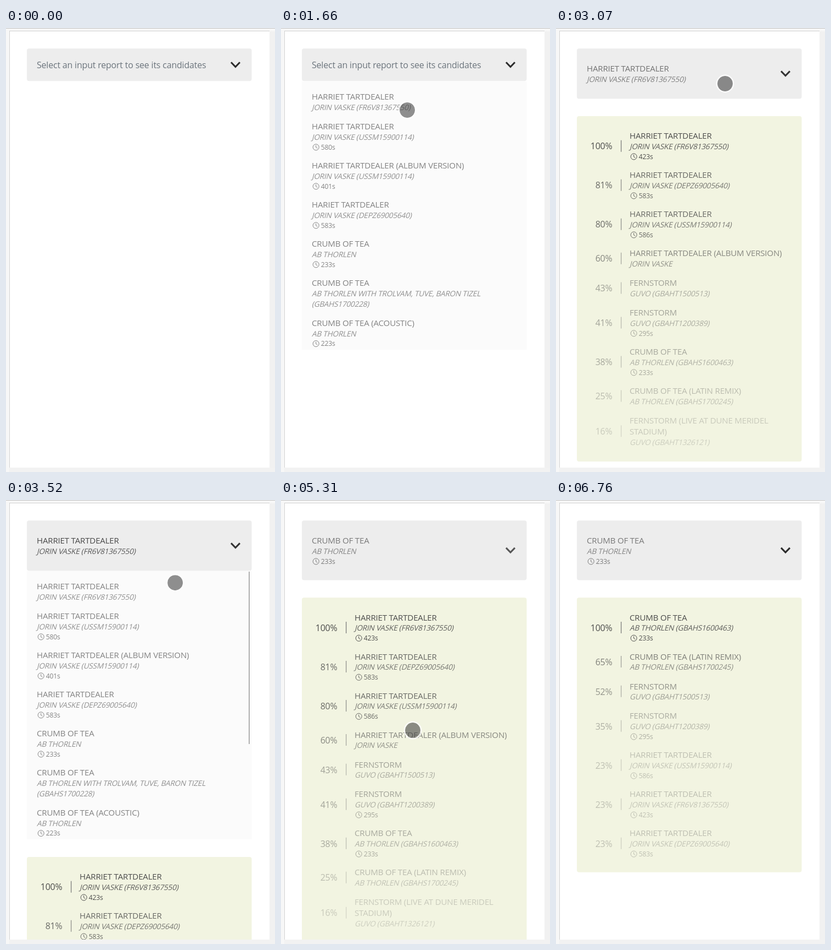
These frames come from a looping animation (490 px wide and 806 px high, 7.21 s). An HTML page with a canvas:

```html
<!DOCTYPE html>
<html lang="en">
<head>
<meta charset="utf-8">
<title>Report candidates</title>
<style>
  html, body { margin: 0; width: 100%; height: 100%; overflow: hidden; background: #f7f7f7; }
  canvas { display: block; width: 490px; height: 806px; }
</style>
</head>
<body>
<canvas id="stage"></canvas>
<script>
const W = 490, H = 806, LOOP = 7210;
const canvas = document.getElementById('stage');
const ctx = canvas.getContext('2d');
const ratio = window.devicePixelRatio || 1;
canvas.width = W * ratio;
canvas.height = H * ratio;

const TUNE = 'HARRIET TARTDEALER', PLAYER = 'JORIN VASKE';
const SONG = 'CRUMB OF TEA', SINGER = 'AB THORLEN';
const ANTHEM = 'FERNSTORM', BAND = 'GUVO';

const item = (title, artist, time) => ({ title: title.split('\n'), artist: artist.split('\n'), time });
const match = (percent, ...rest) => ({ percent, ...item(...rest) });

const reports = [
  item(TUNE, PLAYER + ' (FR6V81367550)'),
  item(TUNE, PLAYER + ' (USSM15900114)', '580s'),
  item(TUNE + ' (ALBUM VERSION)', PLAYER + ' (USSM15900114)', '401s'),
  item('HARIET TARTDEALER', PLAYER + ' (DEPZ69005640)', '583s'),
  item(SONG, SINGER, '233s'),
  item(SONG, SINGER + ' WITH TROLVAM, TUVE, BARON TIZEL\n(GBAHS1700228)'),
  item(SONG + ' (ACOUSTIC)', SINGER, '223s')
];

const tuneMatches = [
  match(100, TUNE, PLAYER + ' (FR6V81367550)', '423s'),
  match(81, TUNE, PLAYER + ' (DEPZ69005640)', '583s'),
  match(80, TUNE, PLAYER + ' (USSM15900114)', '586s'),
  match(60, TUNE + ' (ALBUM VERSION)', PLAYER),
  match(43, ANTHEM, BAND + ' (GBAHT1500513)'),
  match(41, ANTHEM, BAND + ' (GBAHT1200389)', '295s'),
  match(38, SONG, SINGER + ' (GBAHS1600463)', '233s'),
  match(25, SONG + ' (LATIN REMIX)', SINGER + ' (GBAHS1700245)'),
  match(16, ANTHEM + ' (LIVE AT DUNE MERIDEL\nSTADIUM)', BAND + ' (GBAHT1326121)')
];

const songMatches = [
  match(100, SONG, SINGER + ' (GBAHS1600463)', '233s'),
  match(65, SONG + ' (LATIN REMIX)', SINGER + ' (GBAHS1700245)'),
  match(52, ANTHEM, BAND + ' (GBAHT1500513)'),
  match(35, ANTHEM, BAND + ' (GBAHT1200389)', '295s'),
  match(23, TUNE, PLAYER + ' (USSM15900114)', '586s'),
  match(23, TUNE, PLAYER + ' (FR6V81367550)', '423s'),
  match(23, TUNE, PLAYER + ' (DEPZ69005640)', '583s')
];

// Pointer strokes: start, end, number of steps, cubic path.
const strokes = [
  [60, 780, 11, [438, 777], [438, 600], [405, 110], [392, 64]],
  [1010, 1660, 10, [392, 64], [375, 66], [260, 140], [230, 149]],
  [2340, 2690, 6, [230, 149], [240, 152], [258, 155], [269, 154]],
  [2850, 3070, 4, [269, 154], [280, 145], [304, 115], [308, 101]],
  [3380, 3970, 9, [308, 101], [313, 166], [300, 240], [254, 240]],
  [4190, 4840, 10, [254, 240], [250, 275], [202, 400], [201, 439]],
  [5000, 5670, 10, [201, 439], [190, 420], [273, 398], [427, 443]],
  [5740, 6400, 10, [427, 443], [478, 490], [492, 650], [454, 728]],
  [6470, 6760, 5, [454, 728], [450, 745], [434, 780], [430, 806]]
];

const clamp = v => Math.max(0, Math.min(1, v));
const ramp = (t, from, to) => clamp((t - from) / (to - from));

function box(x, y, w, h, color, radius = 0) {
  ctx.fillStyle = color;
  ctx.beginPath();
  ctx.roundRect(x, y, w, h, radius);
  ctx.fill();
}

function line(points, width, color) {
  ctx.strokeStyle = color;
  ctx.lineWidth = width;
  ctx.beginPath();
  points.forEach(([x, y]) => ctx.lineTo(x, y));
  ctx.stroke();
}

// Text is placed by the vertical centre of its capitals.
function text(string, x, middle, size, { slant = 0, color = '#444', align = 'left' } = {}) {
  ctx.save();
  ctx.translate(x, middle + size * 0.357);
  ctx.transform(1, 0, -slant, 1, 0, 0);
  ctx.font = `${size}px "Open Sans", sans-serif`;
  ctx.letterSpacing = '-0.2px';
  ctx.textAlign = align;
  ctx.fillStyle = color;
  ctx.fillText(string, 0, 0);
  ctx.restore();
}

function clock(x, y) {
  ctx.strokeStyle = '#444';
  ctx.lineWidth = 1;
  ctx.beginPath();
  ctx.arc(x, y, 5.5, 0, 7);
  ctx.stroke();
  line([[x, y - 3.5], [x, y + 0.3], [x + 2.7, y + 2]], 1, '#444');
}

// Draws title, artist and time; returns the middle of the last line.
function drawItem({ title, artist, time }, x, y, alpha) {
  ctx.save();
  const base = ctx.globalAlpha;
  ctx.globalAlpha = base * alpha;
  title.forEach((s, i) => text(s, x, y + i * 20, 15.1));
  y += (title.length - 1) * 20 + 19.3;
  ctx.globalAlpha = base * alpha * 0.9;
  artist.forEach((s, i) => text(s, x, y + i * 18.7, 13.6, { slant: 0.25 }));
  y += (artist.length - 1) * 18.7;
  ctx.globalAlpha = base * alpha;
  if (time) {
    y += 18.2;
    clock(x + 7.7, y);
    text(time, x + 16.7, y, 12.2);
  }
  ctx.restore();
  return y;
}

function drawHeader(height, chevron) {
  box(38, 37.3, 409.5, height, '#ededed', 4);
  const y = 37.3 + height / 2;
  line([[410, y - 4.5], [418, y + 3.7], [426, y - 4.5]], 3, chevron);
}

function drawReports(top, bar) {
  box(38, top, 409.5, 487, '#fbfbfb');
  let y = top + 28;
  for (const report of reports) {
    const last = drawItem(report, 56, y, 0.65);
    y = last + (report.time ? 33.5 : 34.6);
  }
  box(442, top + 1, 2, 313, `rgba(176,176,176,${bar})`);
}

function drawMatches(list, top, height, alpha = 1) {
  box(38, top, 409.5, height, '#f2f4e1', 4);
  ctx.save();
  ctx.globalAlpha = alpha;
  let y = top + 36;
  for (const m of list) {
    const strength = 0.1 + 0.0085 * m.percent;
    const last = drawItem(m, 134, y, strength);
    const middle = (y + last) / 2;
    ctx.save();
    ctx.globalAlpha *= strength;
    text(m.percent + '%', 102.5, middle, 16, { align: 'right' });
    box(118, middle - 11, 1.3, 21, '#777');
    ctx.restore();
    y = last + (m.time ? 33.5 : 34.6);
  }
  ctx.restore();
}

function drawPage() {
  box(0, 0, W, H, '#f7f7f7');
  box(480, 6, 10, H, '#f1f1f1');
  box(6, 798, 484, 8, '#f2f2f2');
  box(0, 0, W, 1, '#c2c2c2');
  box(6, 5, 474, 793, '#d2d2d2');
  box(7, 6, 473, 792, '#fff');
}

function drawScreen(t) {
  if (t < 1890) {
    drawHeader(59, '#2b2b2b');
    text('Select an input report to see its candidates', 56, 67.3, 16, { color: '#6c757d' });
    if (t >= 1010) {
      drawReports(97, 1 - ramp(t, 1350, 1650));
      box(38, 37.3, 409.5, 59, `rgba(52,185,237,${0.4 * (1 - ramp(t, 1080, 1300))})`, 4);
    }
  } else if (t < 3380) {
    drawHeader(91.2, t < 2410 ? '#555' : '#333');
    drawItem(reports[0], 56, 74, 0.72);
    drawMatches(tuneMatches, 160, 627, 0.5 + 0.5 * ramp(t, 1890, 2030));
    const bar = ramp(t, 1820, 1960) * (1 - ramp(t, 2340, 2690));
    box(473, 8, 2, 767, `rgba(170,170,170,${bar})`);
  } else if (t < 5000) {
    drawHeader(91.2, '#333');
    drawItem(reports[0], 56, 74, 0.72 + 0.25 * ramp(t, 3380, 3520));
    drawReports(129, 1 - ramp(t, 3600, 3900));
    drawMatches(tuneMatches, 648, 627);
  } else {
    drawHeader(108.2, t < 5430 ? '#555' : '#2b2b2b');
    drawItem(reports[4], 56, 74, 0.68);
    if (t < 5430) drawMatches(tuneMatches, 177.3, 627);
    else drawMatches(songMatches, 177.3, 498.5, 0.5 + 0.5 * ramp(t, 5430, 5600));
  }
}

function pointerAt(t) {
  const [start, end, steps, a, b, c, d] = strokes.filter(s => s[0] <= t).pop();
  const step = Math.floor((t - start) / (end - start) * (steps - 1) + 0.15);
  const p = clamp(step / (steps - 1)), q = 1 - p;
  return a.map((v, i) =>
    q * q * q * v + 3 * q * q * p * b[i] + 3 * q * p * p * c[i] + p * p * p * d[i]);
}

function drawPointer(t) {
  if (t < 60 || t >= 6760) return;
  const [x, y] = pointerAt(t);
  ctx.fillStyle = 'rgba(53,53,53,.55)';
  ctx.beginPath();
  ctx.arc(x, y, 14, 0, 7);
  ctx.fill();
  ctx.strokeStyle = 'rgba(255,255,255,.75)';
  ctx.lineWidth = 2.4;
  ctx.beginPath();
  ctx.arc(x, y, 15.2, 0, 7);
  ctx.stroke();
}

function draw(t) {
  ctx.setTransform(ratio, 0, 0, ratio, 0, 0);
  drawPage();
  ctx.save();
  ctx.beginPath();
  ctx.rect(7, 6, 473, 792);
  ctx.clip();
  drawScreen(t);
  ctx.restore();
  drawPointer(t);
}

let origin;
function tick(now) {
  origin ??= now;
  draw((now - origin) % LOOP);
  requestAnimationFrame(tick);
}
draw(0);
requestAnimationFrame(tick);
</script>
</body>
</html>
```
